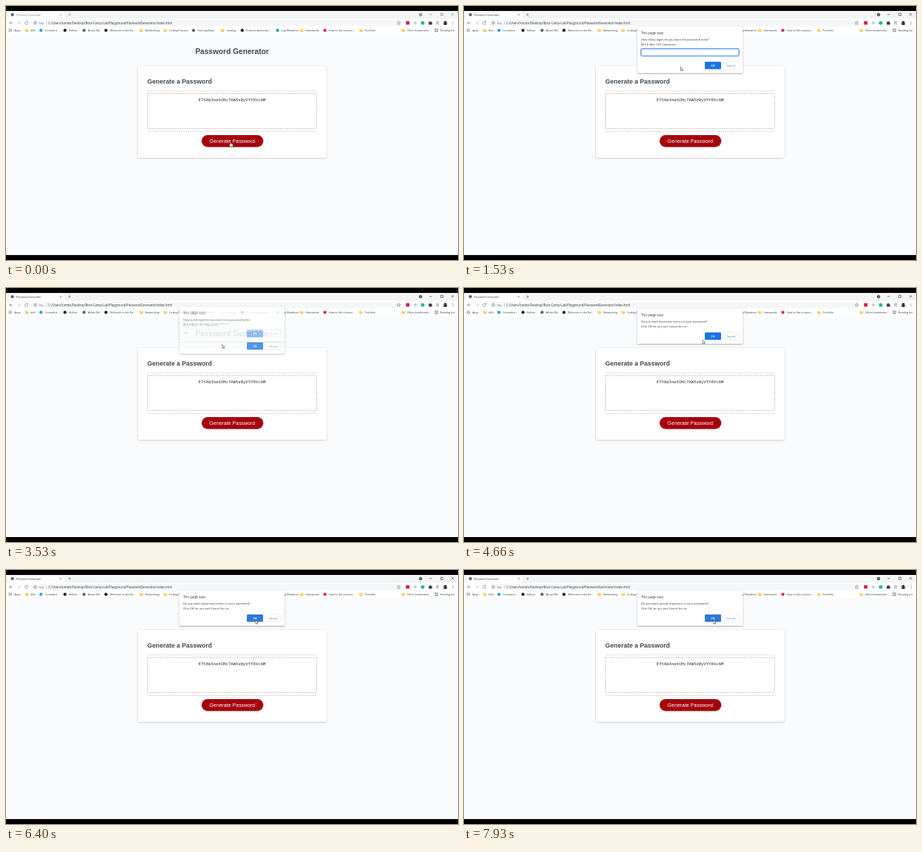
Animation, 640 px wide and 360 px high, one loop 8000 ms. Source, as an HTML page:

```html
<!DOCTYPE html>
<html lang="en">
<head>
<meta charset="utf-8">
<title>Password Generator</title>
<style>
  html, body { margin: 0; width: 100%; height: 100%; overflow: hidden; background: #000; }
  svg { display: block; width: 100vw; height: 100vh; }
  text { font-family: "Open Sans", "Noto Sans", sans-serif; fill: #33363a; white-space: pre; }
  .page { font-family: "Liberation Sans", Arial, sans-serif; fill: #3b4853; }
  .mono { font-family: "Noto Sans Mono", "DejaVu Sans Mono", monospace; fill: #222; }
  .mid { text-anchor: middle; }
  .line { fill: none; stroke: #5f6368; stroke-width: .6; }
</style>
</head>
<body>
<svg id="stage" viewBox="0 0 640 360">
  <defs>
    <filter id="soft" x="-10%" y="-15%" width="120%" height="135%">
      <feDropShadow dx="0" dy=".8" stdDeviation="1.4" flood-opacity=".2"/>
    </filter>
    <filter id="deep" x="-10%" y="-20%" width="120%" height="150%">
      <feDropShadow dx="0" dy=".8" stdDeviation="1.2" flood-opacity=".38"/>
    </filter>
  </defs>
  <rect y="7" width="640" height="346" fill="#f9fbfd"/>

  <g id="chrome">
    <rect y="7" width="640" height="11" fill="#f3f4f6"/>
    <path d="M2 18q2 0 2-2V11q0-2 2-2H81q2 0 2 2v5q0 2 2 2z" fill="#fff"/>
    <rect y="18" width="640" height="22" fill="#fff"/>
    <rect x="36" y="19.5" width="525" height="9" rx="4.5" fill="#f6f7f8"/>
    <g id="frame">
      <text x="14" y="13.9" font-size="3.77">Password Generator</text>
      <path class="line" d="M76 11l2.6 2.6M78.600 11L76 13.600M88 12.300h4M90 10.300v4"/>
      <path class="line" style="stroke:#222" d="M599.500 12h3.600M615.600 10.300h3.200v3.200h-3.200zM630.700 10.200l3.300 3.300M634 10.200l-3.300 3.300"/>
      <circle cx="587" cy="12.300" r="2.200" fill="#3c4043"/>
      <path d="M586 11.700h2l-1 1.300z" fill="#fff"/>
    </g>
    <path class="line" d="M9.500 24H5M7 22L5 24l2 2M30.600 22.600a2.200 2.200 0 1 0 .4 2M31 21.600v1.600h-1.700"/>
    <path class="line" style="stroke:#b8bbbf" d="M16 24h4.500M18.500 22l2 2-2 2M57.500 21.500v5"/>
    <circle class="line" cx="41.500" cy="24" r="1.900"/>
    <path class="line" d="M41.500 23.700v1.300M41.500 22.700v.4"/>
    <text x="47" y="25.600" font-size="4.200" style="fill:#5f6368">File</text>
    <text x="60" y="25.600" font-size="4.420">C:/Users/lumdo/Desktop/Boot-Camp-Lab/Playground/PasswordGenerator/index.html</text>
    <path class="line" style="stroke-width:.5" d="M556 21.500l.7 1.700 1.800.1-1.400 1.200.5 1.800-1.600-1-1.600 1 .5-1.800-1.400-1.200 1.800-.1z"/>
    <rect x="566.300" y="21.500" width="5" height="5" rx=".8" fill="#d8203c"/>
    <circle cx="579.500" cy="24" r="2.300" fill="#c5d5cf"/>
    <circle cx="590" cy="24" r="2.600" fill="#18bd8b"/>
    <path d="M598.500 22.500h1.300a.9.900 0 0 1 1.800 0h1.300v1.300a.9.900 0 0 1 0 1.800v1h-4.400z" fill="#3c4043"/>
    <path class="line" d="M609 22.500h4M609 24h4M609 25.500h2M612.300 24.700v2"/>
    <circle cx="622" cy="24" r="3" fill="#b7a7a0"/>
    <path d="M619.600 26q.4-2 1.400-2.100a1.500 1.500 0 1 1 2 0q1 .1 1.400 2.100-2.400 2-4.800 0z" fill="#33292a"/>
    <path d="M632.600 21.800h.8v.8h-.8zM632.600 23.600h.8v.8h-.8zM632.600 25.400h.8v.8h-.8z" fill="#444"/>
  </g>

  <g id="page">
    <text class="page mid" x="320" y="67.600" font-size="10.670" font-weight="700">Password Generator</text>
    <rect x="187" y="85" width="266.500" height="130" rx="1.700" fill="#fff" filter="url(#soft)"/>
    <text class="page" x="200" y="109.700" font-size="9" font-weight="700">Generate a Password</text>
    <path d="M200 120.300h240M200 177.500h240" stroke="#d2d4d7" stroke-width=".7"/>
    <rect x="200.400" y="124" width="239.300" height="49.700" rx="1" fill="none" stroke="#a3a3a3" stroke-width=".75" stroke-dasharray="2 1.300"/>
    <text class="mono mid" x="320" y="135.300" font-size="5.870">E7YAb3netOHc7AW5r0yVYYRVc6M</text>
    <rect id="button" x="277" y="183" width="87.300" height="16.700" rx="8.350" fill="#a50308" filter="url(#soft)"/>
    <text class="page mid" x="320.500" y="193.700" font-size="7.330" style="fill:#fff">Generate Password</text>
  </g>

  <g id="dialogs"></g>
  <path id="arrow" d="M0 0v5.200l1.300-1.100.8 1.800.9-.4-.8-1.700h1.700z" fill="#fff" stroke="#222" stroke-width=".5"/>
  <path id="hand" d="M-.7 3.800V.5q0-.6.600-.6t.6.600v2q1.900.1 2.700.9v2.200l-.7 1.500H-.4L-2 4.600q0-.9.700-.7z" fill="#fff" stroke="#222" stroke-width=".5"/>
  <path d="M0 0h640v7H0zM0 353h640v7H0z"/>
</svg>
<script>
const $ = id => document.getElementById(id);
const LOOP = 8000, FADE = 330;

// Bookmarks: icon colour (or kind), label x, label
const marks = [
  ['apps', 12, 'Apps'], ['folder', 35, 'bills'], ['#28a3c4', 55, 'Corvadine'],
  ['#1b1f23', 89, 'Kelbox'], ['#5f6368', 116, 'About Me'], ['#222', 147, 'Welcome to the Bo...'],
  ['folder', 197, 'Networking'], ['folder', 231, 'Coding Practice'], ['#5f6368', 271, 'Training Nook'],
  ['folder', 312, 'reading'], ['#222', 340, 'Practise JavaScript...'], ['#28a58c', 390, 'Log Wanderer'],
  ['folder', 424, 'Homework'], ['#d92b45', 457, 'How to Get a Junior...'], ['folder', 508, 'Portfolio'],
  ['folder', 568, 'Other bookmarks'], ['list', 615, 'Reading list']
];

function icon(kind, x) {
  if (kind === 'folder') return `<path d="M${x - 2.300} 32.500h1.900l.7.700h2.200v3.500h-4.800z" fill="#f6d264"/>`;
  if (kind === 'list') return `<rect class="line" x="${x - 2}" y="32.500" width="4" height="4"/><path class="line" d="M${x - 1} 34h2M${x - 1} 35.300h2"/>`;
  if (kind === 'apps') return ['#e35247', '#3da35d', '#437fe0'].map((c, i) =>
    `<path d="M${x - 2 + i * 1.6} 32.300v4.400" stroke="${c}" stroke-dasharray="1.100 .5"/>`).join('');
  return `<circle cx="${x}" cy="34.500" r="2.200" fill="${kind}"/>`;
}

const globe = '<circle cx="9" cy="12.300" r="2.200" fill="#5f6368"/>';
$('chrome').insertAdjacentHTML('beforeend', globe + marks.map(([kind, x, label]) =>
  icon(kind, x - 5.500) + `<text x="${x}" y="35.900" font-size="3.750">${label}</text>`).join(''));

const confirm = 'Click OK for yes and Cancel for no';
const ask = what => `Do you want ${what} in your password?`;
const dialogs = [
  { from: 780, lines: ['How many digits do you want the password to be?', 'Min 8 Max 128 Characters'], prompt: true },
  { from: 3400, lines: [ask('lowercase letters'), confirm] },
  { from: 5130, lines: [ask('Uppercase letters'), confirm] },
  { from: 6420, lines: [ask('numbers'), confirm] },
  { from: 7560, lines: [ask('special characters'), confirm] }
];

dialogs.forEach((d, i) => {
  const h = d.prompt ? 66 : 50, y = d.prompt ? 84.300 : 68.300;
  d.to = dialogs[i + 1]?.from ?? Infinity;
  $('dialogs').insertAdjacentHTML('beforeend', `<g>
    <rect x="245.500" y="29" width="149" height="${h}" rx="1.300" fill="#fff" filter="url(#deep)"/>
    <text x="250.700" y="39.800" font-size="4.750">This page says</text>
    <text x="250.700" y="49.300" font-size="4.140">${d.lines[0]}</text>
    <text x="250.700" y="56" font-size="4.140">${d.lines[1]}</text>
    ${d.prompt ? `<rect id="field" x="250.600" y="60.700" width="138.800" height="10.200" rx="1" fill="#fff" stroke-width="1"/>
    <text id="typed" x="253" y="67.200" font-size="4.100"></text><path id="caret" stroke="#222" stroke-width=".4"/>` : ''}
    <rect class="ok" x="341" y="${y - 5.300}" width="23" height="10.600" rx="1.300" fill="#1a73e8"/>
    <text class="mid" x="352.500" y="${y + 1.400}" font-size="4" font-weight="600" style="fill:#fff">OK</text>
    <rect x="366.300" y="${y - 5.200}" width="23" height="10.400" rx="1.300" fill="#fff" stroke="#dadce0" stroke-width=".5"/>
    <text class="mid" x="377.800" y="${y + 1.400}" font-size="4" style="fill:#3c78d8">Cancel</text></g>`);
  d.el = $('dialogs').lastElementChild;
});

// Pointer stops: time, x, y
const stops = [[0, 318, 192.500], [900, 318, 192.500], [1420, 306.500, 86.500], [1530, 306.500, 86.300], [1860, 306, 80],
  [4400, 306, 80], [4660, 337.800, 73.500], [4950, 353.200, 71], [LOOP, 353.200, 71]];

const clamp = v => Math.min(1, Math.max(0, v));
const ease = v => v * v * (3 - 2 * v);

function pointer(t) {
  const i = stops.findIndex(s => s[0] > t);
  const [a, b] = [stops[i - 1], stops[i]];
  const k = ease((t - a[0]) / (b[0] - a[0]));
  return [a[1] + (b[1] - a[1]) * k, a[2] + (b[2] - a[2]) * k];
}

function draw(t) {
  for (const d of dialogs) {
    const p = clamp((t - d.from) / FADE), q = clamp((t - d.to) / FADE);
    d.el.setAttribute('opacity', p * (1 - q ** 1.5));
    d.el.setAttribute('transform', `translate(0 ${-6 * (1 - p) - 5 * q})`);
  }
  const typed = t < 2600 ? '' : t < 2860 ? '2' : '27';
  $('typed').textContent = typed;
  $('field').setAttribute('stroke', t < 3400 ? '#1a73e8' : '#e3e6ea');
  $('caret').setAttribute('d', t > 2260 && t < 3130 ? `M${253.400 + typed.length * 2.350} 63.500v4.600` : '');

  const [x, y] = pointer(t), onButton = y > 183;
  for (const [id, shown] of [['hand', onButton], ['arrow', !onButton]]) {
    $(id).setAttribute('transform', `translate(${x} ${y})`);
    $(id).setAttribute('visibility', shown ? 'visible' : 'hidden');
  }
  const hover = t > 4850 ? '#2f78d6' : '#1a73e8';
  document.querySelectorAll('.ok').forEach(el => el.setAttribute('fill', hover));
  $('frame').setAttribute('opacity', t < 650 ? .6 : 1);
}

function tick() {
  draw(performance.now() % LOOP);
  requestAnimationFrame(tick);
}
tick();
</script>
</body>
</html>
```
